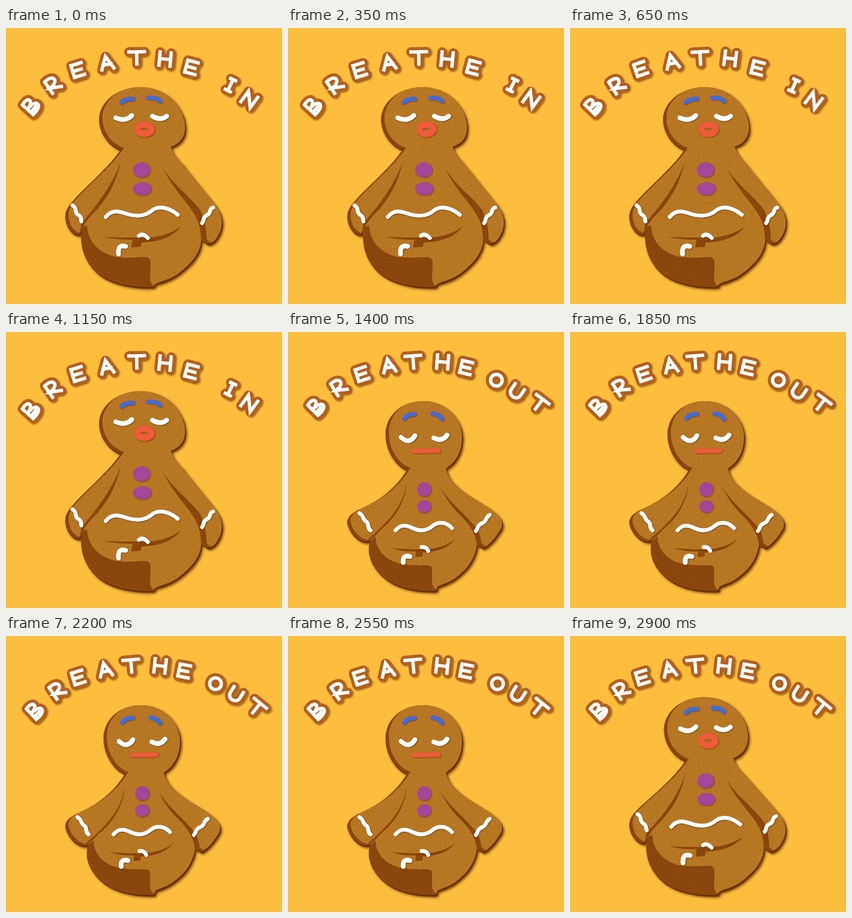
An HTML page for the animation above (2950 ms loop, 498 by 498 pixels).

```html
<!DOCTYPE html>
<html lang="en">
<head>
<meta charset="utf-8">
<title>Breathe in, breathe out</title>
<style>
  html, body { margin: 0; width: 100%; height: 100%; overflow: hidden; background: #fdbe3e; }
  svg { display: block; width: 100vw; height: 100vh; }
  #cookie { filter: drop-shadow(2.5px 3px .5px #6a310a) drop-shadow(2px 2.5px 2px rgba(75, 28, 0, .7)); }
  #icing { filter: drop-shadow(1px 1.5px .8px rgba(75, 30, 0, .55)); }
  .dark { fill: #8b430e; }
  .line { fill: none; stroke: #fff; stroke-linecap: round; stroke-linejoin: round; stroke-width: 7; }
  .eye { stroke-width: 8.5; }
  .brow { stroke: #416ce2; stroke-width: 7.5; }
  .red { stroke: #ef5b3c; }
  .button { fill: #a5459b; }
  .word { filter: drop-shadow(2px 2.5px 1.5px rgba(95, 45, 0, .6)); }
  .word path { fill: none; stroke-linejoin: round; stroke-linecap: round; }
  .crust { stroke: #b2601f; stroke-width: 17; }
  .word .sugar { stroke: #fff; stroke-width: 6; stroke-linecap: square; stroke-linejoin: miter; }
</style>
</head>
<body>
<svg viewBox="0 0 498 498">
  <defs>
    <clipPath id="cut"><path data-part="outline"/></clipPath>
    <filter id="grain" x="0" y="0" width="1" height="1">
      <feTurbulence type="fractalNoise" baseFrequency=".3" numOctaves="3" seed="4"/>
      <feColorMatrix values="0 0 0 0 .3  0 0 0 0 .13  0 0 0 0 0  1.6 0 0 0 -.6"/>
    </filter>
  </defs>

  <g id="cookie"><path class="dark" data-part="outline"/></g>
  <g clip-path="url(#cut)">
    <path data-part="outline" fill="#bb7928" transform="translate(6 -3)"/>
    <path class="dark" data-part="armL"/>
    <path class="dark" data-part="armR"/>
    <path class="dark" data-part="leg"/>
    <path class="dark" data-part="crease"/>
    <rect x="100" y="100" width="300" height="380" filter="url(#grain)" opacity=".45"/>
  </g>

  <g id="icing">
    <path class="line" data-part="belly"/>
    <path class="line" data-part="cuffL"/>
    <path class="line" data-part="cuffR"/>
    <path class="line" data-part="toeL" style="stroke-width:8.5"/>
    <path class="line" data-part="toeR"/>
    <path class="line eye" data-part="eyeL"/>
    <path class="line eye" data-part="eyeR"/>
    <path class="line brow" data-part="browL"/>
    <path class="line brow" data-part="browR"/>
    <path class="button" data-part="buttonTop"/>
    <path class="button" data-part="buttonLow"/>
    <path class="line red" id="round" data-part="mouth" style="stroke-width:11"/>
    <path class="line red" id="flat" data-part="lips" style="stroke-width:8"/>
  </g>
  <g id="words"></g>
</svg>

<script>
const LOOP = 2950, WIGGLE = 169, OUT_TEXT = 1300;
const EXHALE = [1160, 1400], INHALE = [2650, 2960];

const oval = (x, y, rx, ry) =>
  `M${x - rx} ${y} a${rx} ${ry} 0 1 1 ${2 * rx} 0 a${rx} ${ry} 0 1 1 ${-2 * rx} 0 Z`;

// Each part: lungs full, lungs empty.
const parts = {
  outline: [
    `M207 219 C190 215 168 195 168 165 C168 138 195 107 243 107 C290 107 323 142 323 180
     C323 198 312 210 297 214 C301 226 308 234 317 244 C338 270 360 297 380 322
     C392 340 392 358 383 374 C376 388 366 391 362 389 L352 382
     C352 400 340 418 326 430 C310 446 292 456 270 461 L266 467
     C240 469 200 464 175 449 C148 432 132 405 136 360 L132 373
     C118 374 106 358 107 338 C108 325 118 315 128 304 C158 273 188 248 207 219 Z`,
    `M215 248 C194 242 176 215 176 185 C176 150 205 125 243 125 C285 125 314 155 314 190
     C314 215 303 235 285 246 C288 262 300 276 318 289 C338 304 360 314 376 328
     C388 338 389 350 381 360 C374 372 362 385 352 390 L341 384
     C338 404 328 420 318 430 C304 444 290 453 270 459 L267 467
     C240 468 205 464 182 449 C155 432 140 405 148 378 L143 378
     C130 380 110 365 107 345 C106 335 114 328 125 322 C165 305 195 282 215 248 Z`],
  armL: [
    "M207 242 C196 272 176 307 136 352 L133 373 C140 352 150 342 160 332 C186 305 199 275 207 242 Z",
    "M214 272 C208 310 190 335 146 372 L143 379 C155 370 160 365 166 358 C195 335 212 305 214 272 Z"],
  armR: [
    "M283 252 C298 280 332 303 350 328 C358 345 363 360 362 390 L352 384 C352 350 340 335 325 315 C305 290 292 272 283 252 Z",
    "M275 279 C290 308 326 333 343 358 C348 370 350 380 349 392 L341 384 C338 362 325 345 312 332 C295 315 284 300 275 279 Z"],
  leg: [
    `M146 356 C148 385 165 402 190 411 C205 416 235 414 252 413 Q261 414 261 424 L260 455 L266 468
     C240 469 200 464 175 449 C148 432 132 405 136 360 Z`,
    `M158 368 C158 390 172 408 195 416 C210 421 235 421 252 421 Q260 421 260 428 L260 455 L267 468
     C240 468 205 464 182 449 C155 432 140 405 148 378 Z`],
  crease: [
    "M176 377 C200 378 225 378 240 378 C262 381 295 373 315 359 C300 378 275 386 245 387 L243 395 L226 396 L228 382 C210 382 195 381 176 377 Z",
    "M188 390 C210 392 228 392 240 392 C264 393 290 385 302 373 C290 389 270 397 243 398 L243 405 L230 406 L231 396 C215 396 200 395 188 390 Z"],
  belly: [
    "M180 341 C192 326 205 331 220 336 C240 342 255 337 265 328 C280 319 298 327 310 337",
    "M194 358 C203 347 213 348 225 354 C240 361 252 358 262 349 C275 340 288 345 296 354"],
  cuffL: [
    "M120 320 C130 326 122 332 130 337 C137 341 135 345 136 349",
    "M129 327 C138 332 134 338 141 342 C148 346 141 352 149 358"],
  cuffR: [
    "M374 324 C365 326 372 334 362 338 C354 342 358 348 354 352",
    "M364 330 C355 334 360 342 350 345 C340 350 344 354 339 359"],
  toeL: ["M203 408 C202 396 206 391 216 394", "M208 416 C207 405 212 403 220 405"],
  toeR: ["M240 375 Q247 369 256 379", "M241 388 Q250 387 253 395"],
  eyeL: ["M198 162 Q215 170 227 158", "M204 190 Q219 204 229 187"],
  eyeR: ["M264 159 Q279 168 290 159", "M263 191 Q278 199 287 186"],
  browL: ["M209 134 Q216 127 229 128", "M210 156 Q215 148 228 148"],
  browR: ["M257 126 Q272 125 278 132", "M261 147 Q272 148 278 157"],
  buttonTop: [oval(245, 256, 15.5, 13.5), oval(246, 284, 12.5, 13)],
  buttonLow: [oval(246, 290, 16.5, 11.5), oval(246, 315, 12.5, 11)],
  mouth: [oval(250, 183, 12.5, 8.5), oval(249, 214, 12.5, 8.5)],
  lips: ["M228 185 L271 184", "M228 215 L271 214"]
};

// Hand-piped letter strokes, centred on the origin.
const glyphs = {
  B: "M-10 13 V-13 C10 -17 9 -2 -8 -1 C17 -2 15 16 -10 13 Z M-8 7 H3",
  R: "M-9 13 V-12 C13 -16 14 2 -7 3 L11 12",
  E: "M10 -11 L-9 -11 V11 L10 11 M-9 0 H7",
  A: "M-11 12 L-1 -11 L11 12 M-7 4 H7",
  T: "M-14 -11 H14 M0 -11 V11",
  H: "M-10 -12 V12 M10 -12 V12 M-10 0 H10",
  I: "M0 -11 V11 M-5 -11 H5 M-5 11 H5",
  N: "M-10 12 V-11 L10 11 V-12",
  O: oval(0, 0, 10.5, 10.5),
  U: "M-10 -11 V1 C-10 14 10 14 10 1 V-11"
};

// Letters as [x, y, angle], two wiggle poses per phrase.
const words = [
  ["BREATHEIN", [[46,140,-48], [84,102,-35], [129,76,-17], [182,62,-9], [236,54,-1],
                 [287,56,5], [334,71,15], [405,103,26], [439,129,36]]],
  ["BREATHEIN", [[43,140,-46], [84,103,-33], [127,74,-19], [184,60,-11], [235,54,-3],
                 [289,55,7], [338,72,14], [404,104,24], [440,131,37]]],
  ["BREATHEOUT", [[52,134,-45], [91,99,-32], [133,76,-18], [182,60,-9], [226,54,-4],
                  [279,54,4], [321,64,13], [376,87,25], [412,108,34], [453,130,37]]],
  ["BREATHEOUT", [[53,134,-43], [92,98,-34], [130,75,-17], [179,60,-11], [226,54,-5],
                  [278,54,6], [321,63,11], [378,86,27], [414,106,32], [452,130,39]]]
];

const letter = (char, [x, y, angle]) =>
  `<g transform="translate(${x} ${y}) rotate(${angle})">
     <path class="crust" d="${glyphs[char]}"/><path class="sugar" d="${glyphs[char]}"/>
   </g>`;

const holder = document.getElementById("words");
holder.innerHTML = words.map(([text, spots]) =>
  `<g class="word" role="img" aria-label="${text.replace("BREATHE", "BREATHE ")}">
     ${spots.map((spot, i) => letter(text[i], spot)).join("")}
   </g>`
).join("");
const phrases = [...holder.children];

const shapes = [...document.querySelectorAll("[data-part]")];
const round = document.getElementById("round");
const flat = document.getElementById("flat");
const number = /-?\d+(\.\d+)?/g;

function mix([from, to], k) {
  const ends = to.match(number);
  let i = 0;
  return from.replace(number, n => +n + (ends[i++] - n) * k);
}

const ramp = (t, [a, b]) => Math.min(1, Math.max(0, (t - a) / (b - a)));

let lastEmpty = -1;
function draw(now) {
  const t = now % LOOP;
  const empty = ramp(t, EXHALE) - ramp(t, INHALE);
  if (empty !== lastEmpty) {
    for (const el of shapes) el.setAttribute("d", mix(parts[el.dataset.part], empty));
    round.style.display = empty < .5 ? "" : "none";
    flat.style.display = empty < .5 ? "none" : "";
    lastEmpty = empty;
  }
  const shown = (t < OUT_TEXT ? 0 : 2) + Math.floor(t / WIGGLE) % 2;
  phrases.forEach((g, i) => { g.style.display = i === shown ? "" : "none"; });
}

const start = performance.now();
function tick() {
  draw(performance.now() - start);
  requestAnimationFrame(tick);
}
tick();
</script>
</body>
</html>
```
